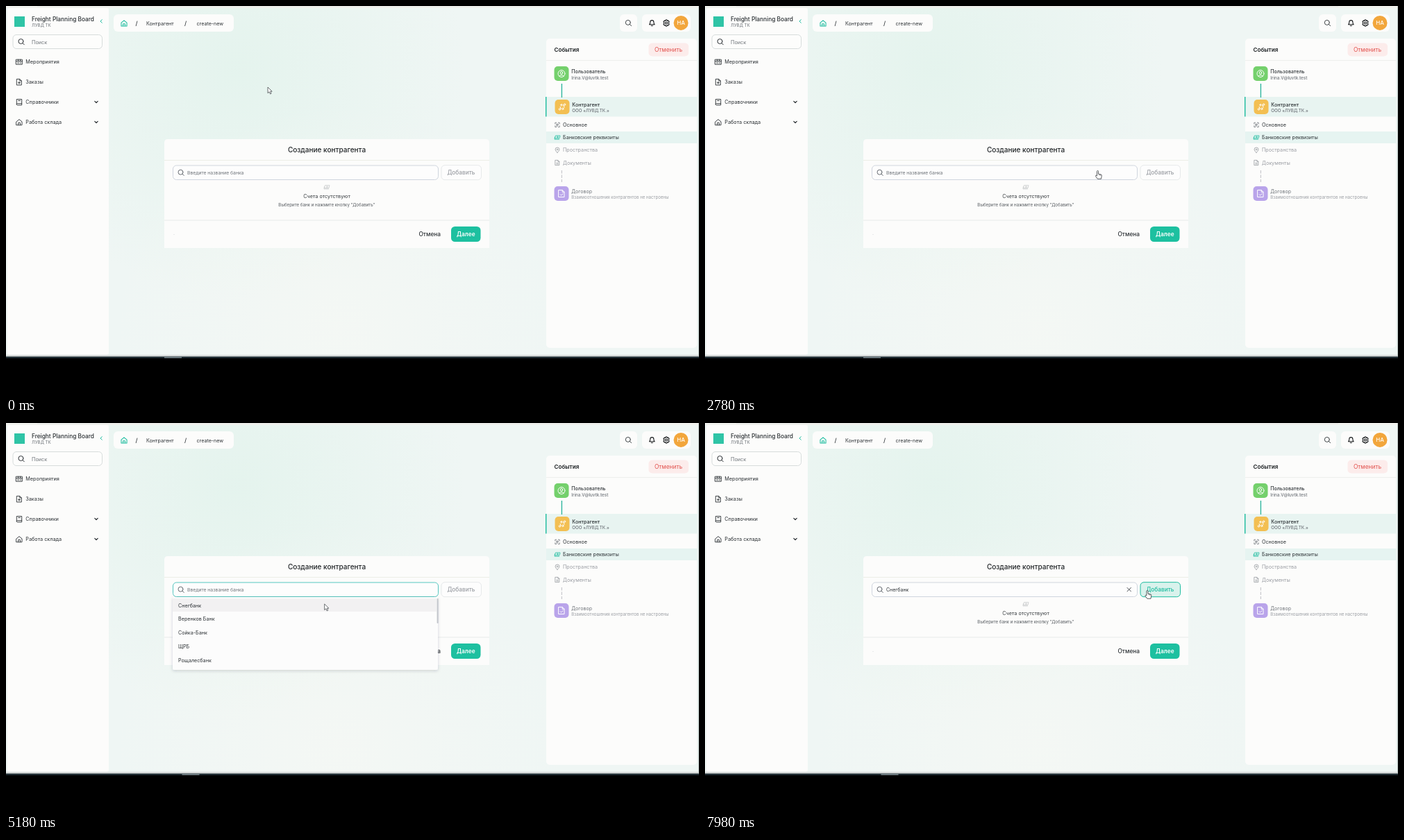
An HTML page that plays this animation: 998 px wide and 561 px high, repeating every 8000 ms.

```html
<!DOCTYPE html>
<html lang="ru">
<head>
<meta charset="utf-8">
<title>Создание контрагента</title>
<style>
  html, body { margin: 0; width: 100%; height: 100%; overflow: hidden; background: #000; }
  svg { display: block; width: 998px; height: 561px; font-family: Inter, "Noto Sans", sans-serif; }
  .icon { fill: none; stroke-linecap: round; stroke-linejoin: round; }
</style>
</head>
<body>
<svg id="stage" viewBox="0 0 998 561" xmlns="http://www.w3.org/2000/svg"></svg>
<script>
const LOOP = 8000;
const INK = '#2b3034', MUTED = '#6f747a', PALE = '#9a9da3', GREEN = '#1cbc9f', PANEL = '#fcfcfb';
const BANKS = ['Снегбанк', 'Веренков Банк', 'Сойка-Банк', 'ЩРБ', 'Рощалесбанк'];

// Text is placed by its vertical middle.
const text = (x, y, size, str, fill = INK, weight = 400, anchor = 'start') =>
  `<text x="${x}" y="${(y + size * .36).toFixed(2)}" font-size="${size}" font-weight="${weight}" fill="${fill}" text-anchor="${anchor}">${str}</text>`;
const box = (x, y, w, h, r, fill, extra = '') =>
  `<rect x="${x}" y="${y}" width="${w}" height="${h}" rx="${r}" fill="${fill}" ${extra}/>`;
const icon = (x, y, d, color = INK, width = .9) =>
  `<path class="icon" transform="translate(${x} ${y})" d="${d}" stroke="${color}" stroke-width="${width}"/>`;
const line = (x1, y1, x2, y2, color, width = 1, extra = '') =>
  `<path d="M${x1} ${y1}L${x2} ${y2}" stroke="${color}" stroke-width="${width}" ${extra}/>`;
const group = (id, body) => `<g id="${id}">${body}</g>`;

// Icon outlines, centred on 0,0.
const SHAPES = {
  search: 'M3 -.5A3.5 3.5 0 1 1 -4 -.5A3.5 3.5 0 1 1 3 -.5M2 2L4.3 4.3',
  home: 'M-4 -.8L0 -4.2L4 -.8V4H-4ZM-1.4 4V.8H1.4V4',
  events: 'M-4.3 -3.5H4.3V3.5H-4.3ZM-4.3 -1H4.3M-1.5 -3.5V-1M1.5 -3.5V-1M-2.5 1.3H-.5M1.2 1.3H2.6',
  order: 'M-3.3 -4.3H.8L3.3 -1.8V4.3H-3.3ZM.8 -4.3V-1.8H3.3M-1.5 1H1.5M0 -.5V2.5',
  book: 'M-3.7 3V-4.2H3.7V4.2H-2.6Q-3.7 4.2 -3.7 3Q-3.7 2 -2.6 2H3.7M-1.3 -2.2H1.5',
  down: 'M-2.2 -1.1L0 1.1L2.2 -1.1',
  bell: 'M-3.8 2.6Q-2.6 1.3 -2.6 -.8A2.6 2.8 0 0 1 2.6 -.8Q2.6 1.3 3.8 2.6ZM-1 4.2Q0 4.9 1 4.2',
  gear: 'M-1 -4.4H1L1.4 -3L2.9 -3.4L4.1 -1.7L3.2 -.6V.6L4.1 1.7L2.9 3.4L1.4 3L1 4.4H-1L-1.4 3L-2.9 3.4L-4.1 1.7L-3.2 .6V-.6L-4.1 -1.7L-2.9 -3.4L-1.4 -3ZM1.5 0A1.5 1.5 0 1 1 -1.5 0A1.5 1.5 0 1 1 1.5 0',
  user: 'M5 0A5 5 0 1 1 -5 0A5 5 0 1 1 5 0M1.8 -1.2A1.8 1.8 0 1 1 -1.8 -1.2A1.8 1.8 0 1 1 1.8 -1.2M-3.2 3.7Q0 .2 3.2 3.7',
  route: 'M-2 -2.8H.3Q2.8 -2.8 2.8 -.3V1M2 2.8H-.3Q-2.8 2.8 -2.8 .3V-.3M-.6 -4.4L-2.2 -2.8L-.6 -1.2M.6 1.2L2.2 2.8L.6 4.4M4.8 -3.4A1.2 1.2 0 1 1 2.4 -3.4A1.2 1.2 0 1 1 4.8 -3.4M-2.4 3.4A1.2 1.2 0 1 1 -4.8 3.4A1.2 1.2 0 1 1 -2.4 3.4',
  contract: 'M-4 -5H1.2L4 -2.2V5H-4ZM1.2 -5V-2.2H4M-1.8 1.3L-.4 2.7L2 .2',
  scan: 'M-3.2 -1.4V-3.2H-1.4M1.4 -3.2H3.2V-1.4M3.2 1.4V3.2H1.4M-1.4 3.2H-3.2V1.4M-1.4 -1.2H1.4M-1.4 .2H1.4M-1.4 1.6H.6',
  cash: 'M-2.2 -2.6H4L3 1.2H-3.2ZM-3.6 -.6L-4 2.6H2.6M1.3 -.7A.9 .9 0 1 1 -.5 -.7A.9 .9 0 1 1 1.3 -.7',
  pin: 'M0 3.7Q-3 .9 -3 -.8A3 3 0 0 1 3 -.8Q3 .9 0 3.7ZM1 -.8A1 1 0 1 1 -1 -.8A1 1 0 1 1 1 -.8',
  file: 'M-2.8 -3.6H.8L2.8 -1.6V3.6H-2.8ZM.8 -3.6V-1.6H2.8M-1.2 .4H1.2M-1.2 2H1.2',
  cross: 'M-2.7 -2.7L2.7 2.7M2.7 -2.7L-2.7 2.7'
};

const page = [
  box(0, 0, 998, 506, 0, '#eff6f4'),
  box(148, 3, 850, 500, 0, 'url(#mint)'),
  box(148, 3, 850, 500, 0, 'url(#cream)'),
  box(0, 0, 998, 3, 0, '#f1f2ee'),
  line(45, .8, 912, .8, '#e2e5e2', .8),
  box(0, 503, 998, 2.5, 0, '#dcdfde'),
  box(0, 505.5, 998, 2.5, 0, '#1d2a30'),
  line(997.5, 0, 997.5, 505, '#aeb8b6', 1)
];

const sidebar = [
  box(2, 3, 146, 500, 3, PANEL),
  box(12, 15, 15, 15, 0, '#2fc4a6'),
  text(37, 18.7, 8.32, 'Freight Planning Board', INK, 500),
  text(37, 27.8, 6.24, 'ЛУВД ТК', MUTED),
  icon(137, 22, 'M1.3 -2.3L-1 0L1.3 2.3', GREEN, 1),
  box(10, 41.5, 128.5, 20, 5, '#fdfdfc', 'stroke="#d3d8d8" stroke-width=".9"'),
  icon(22, 51.5, SHAPES.search, INK, 1),
  text(37, 52, 7.28, 'Поиск', MUTED),
  ...[['events', 'Мероприятия'], ['order', 'Заказы'], ['book', 'Справочники'], ['home', 'Работа склада']]
    .map(([shape, label], i) => {
      const y = 80.7 + i * 29;
      return icon(19, y, SHAPES[shape]) + text(28.3, y, 7.28, label) +
        (i > 1 ? icon(130, y - .3, SHAPES.down, INK, 1.2) : '');
    })
];

const header = [
  box(155, 12, 173, 25, 6, PANEL),
  icon(170, 25, SHAPES.home, GREEN, 1.1),
  text(188, 25, 8.5, '/', INK, 500, 'middle'),
  text(202, 25, 7.15, 'Контрагент'),
  text(258.5, 25, 8.5, '/', INK, 500, 'middle'),
  text(274.5, 25, 7.15, 'create-new'),
  box(884, 12, 25, 25, 6, PANEL),
  icon(896.3, 24.4, SHAPES.search),
  box(916, 12, 70, 25, 6, PANEL),
  icon(930.3, 24.2, SHAPES.bell, '#16191b', 1.1),
  icon(951, 24.5, SHAPES.gear, '#16191b', 1.1),
  '<circle cx="972" cy="24.4" r="10.5" fill="#f2a63c"/>',
  text(972, 24.6, 8, 'HA', '#fff', 500, 'middle')
];

const steps = [
  box(778, 47, 217, 446, 5, PANEL),
  text(789.5, 63, 8.1, 'События', '#1c2023', 600),
  box(925.5, 53.5, 57.5, 19, 5, '#fceceb'),
  text(954, 63.2, 8.32, 'Отменить', '#e2504c', 400, 'middle'),
  line(778, 78.5, 995, 78.5, '#eeefed'),
  box(778, 131, 217, 28.5, 0, '#e8f4f1'),
  box(777, 131, 1.4, 28.5, 0, GREEN),
  box(778, 181, 217, 17, 0, '#e6f4f1'),
  line(800.4, 112, 800.4, 132, '#2fb59f', 1.4),
  line(800.4, 237, 800.4, 254, '#c8c9cd', 1.2, 'stroke-dasharray="4.5 2"'),
  box(789.5, 87, 21, 21, 5, '#74d06c'),
  icon(800, 97.5, SHAPES.user, '#fff', 1),
  text(814.3, 94.2, 7.1, 'Пользователь', INK, 500),
  text(814.3, 103.3, 6.24, 'Irina.V@luvtk.test', MUTED, 500),
  box(790.5, 135, 21, 21, 5, '#f3bf52'),
  icon(801, 145.5, SHAPES.route, '#fff', 1),
  text(815.3, 142, 7.1, 'Контрагент', INK, 500),
  text(815.3, 151, 6.24, 'ООО «ЛУВД.ТК.»', MUTED, 500),
  ...[['scan', 'Основное', MUTED, INK], ['cash', 'Банковские реквизиты', GREEN, INK],
      ['pin', 'Пространства', PALE, PALE], ['file', 'Документы', PALE, PALE]]
    .map(([shape, label, tint, ink], i) => {
      const y = 171.4 + i * 18.2;
      return icon(794, y, SHAPES[shape], tint, .8) + text(802, y, 7.2, label, ink);
    }),
  box(789.5, 260, 21, 21, 5, '#b9a4ea'),
  icon(800, 270.5, SHAPES.contract, '#fff', 1),
  text(814.3, 267, 7.1, 'Договор', MUTED),
  text(814.3, 275.6, 6.1, 'Взаимоотношения контрагентов не настроены', PALE)
];

const dialog = [
  '<path d="M228 349V197Q228 192 233 192H691Q696 192 696 197V349Z" fill="#fcfcfb"/>',
  text(462, 207.5, 10.05, 'Создание контрагента', '#202427', 500, 'middle'),
  line(228, 222.5, 696, 222.5, '#eceee6'),
  line(228, 309, 696, 309, '#e8ebe9'),
  box(240.5, 230, 382, 20.5, 5, '#fdfdfd', 'id="field" stroke="#cfd5de" stroke-width="1"'),
  icon(252, 240.2, SHAPES.search, '#555b61', .9),
  group('hint', text(261, 240.2, 6.8, 'Введите название банка', MUTED)),
  group('chosen', text(261, 240.2, 7, BANKS[0]) + icon(610.7, 240.2, SHAPES.cross, '#4b5055', 1)),
  box(627, 229.7, 57.5, 21, 5, '#fdfdfd', 'id="add" stroke-width="1"'),
  group('addLabel', text(655.5, 240.3, 8.32, 'Добавить', 'inherit', 500, 'middle')),
  icon(462, 261.3, SHAPES.cash, '#c6c8ca', .8),
  text(462, 274.3, 7.25, 'Счета отсутствуют', '#34393d', 400, 'middle'),
  text(462, 286.7, 6.2, 'Выберите банк и нажмите кнопку "Добавить"', '#565b60', 400, 'middle'),
  '<circle cx="242" cy="329.5" r=".6" fill="#d3d5d6"/>',
  text(610.3, 329.2, 8.32, 'Отмена', INK, 500, 'middle'),
  box(641, 318, 42.5, 22, 5.5, '#1dc0a0'),
  text(662.3, 329.2, 8.32, 'Далее', '#fff', 600, 'middle')
];

const list = group('list',
  box(240, 251, 382, 105, 2, '#fcfcfc', 'filter="url(#shadow)"') +
  box(240, 253, 380, 19, 0, '#f2f1f2', 'id="hover"') +
  BANKS.map((name, i) => text(248, 263 + i * 19.75, 7.2, name)).join('') +
  box(620.6, 253, 2, 36, 1, '#c3c6cc'));

const pointers =
  `<g id="pointer"><path id="arrow" d="M0 0V8.6L2 6.8L3.5 9.9L5 9.2L3.6 6.2H6.2Z" fill="#fff" stroke="#45494d" stroke-width=".8" stroke-linejoin="round"/>
  <g id="hand" stroke="#34383b" stroke-width=".8" stroke-linejoin="round">
    <path d="M-1 7.5V1A1 1 0 0 1 1 1V4.8L4.6 5.5Q5.9 5.8 5.8 7L5 11.8H-.2L-3 8Q-3.2 6.5 -1.7 6.9Z" fill="#fff"/>
    <path d="M2.6 5.2V7M4.3 5.5V7.2" fill="none" stroke-width=".6"/>
  </g></g>`;

const blob = (id, cx, cy, r, color, alpha) =>
  `<radialGradient id="${id}" gradientUnits="userSpaceOnUse" cx="${cx}" cy="${cy}" r="${r}">
    <stop stop-color="${color}" stop-opacity="${alpha}"/><stop offset="1" stop-color="${color}" stop-opacity="0"/></radialGradient>`;

const stage = document.getElementById('stage');
stage.innerHTML = `<defs>${blob('mint', 330, 90, 330, '#e2f3ec', .8)}${blob('cream', 480, 470, 330, '#f6f8f4', .7)}
  <filter id="shadow" x="-5%" y="-10%" width="110%" height="125%">
    <feDropShadow dx="0" dy="1.5" stdDeviation="2" flood-color="#20303a" flood-opacity=".18"/></filter></defs>` +
  [...page, box(228, 505.5, 25, 2.5, 0, '#69777c', 'id="task"'), ...sidebar, ...header, ...steps, ...dialog, list,
   `<path id="caret" d="M261.8 236V244" stroke="#25292c" stroke-width=".9"/>`, pointers].join('');

const part = Object.fromEntries([...stage.querySelectorAll('[id]')].map(el => [el.id, el]));
const show = (name, on) => part[name].setAttribute('visibility', on ? 'inherit' : 'hidden');
const set = (name, attrs) => Object.entries(attrs).forEach(([k, v]) => part[name].setAttribute(k, v));

// Pointer tip: time, x, y
const PATH = [
  [0, 377, 117], [120, 378, 117], [820, 552, 150], [1300, 665, 222], [1520, 672, 228], [1800, 672, 228],
  [2400, 588, 236], [2780, 565.5, 237.5], [3300, 516, 241], [4000, 474, 258], [4500, 473, 258],
  [4900, 458.7, 261], [6500, 458.7, 261], [7300, 632, 243], [7700, 637, 241.5], [LOOP, 637, 241.5]
];
const FOCUS = 3210, HOVER = 4660, PICK = 5600, ADD_HOVER = 7260;

function pointerAt(t) {
  const i = PATH.findIndex(p => p[0] > t);
  const [t0, x0, y0] = PATH[i - 1], [t1, x1, y1] = PATH[i];
  const u = (t - t0) / (t1 - t0), k = u * u * (3 - 2 * u);
  return [x0 + (x1 - x0) * k, y0 + (y1 - y0) * k];
}

function render(t) {
  const open = t >= FOCUS && t < PICK, picked = t >= PICK, overAdd = t >= ADD_HOVER;
  const handy = (t >= 2160 && t < HOVER) || overAdd;
  show('list', open);
  show('hover', open && t >= HOVER);
  show('caret', open && (t - FOCUS) % 1000 < 500);
  show('hint', !picked);
  show('chosen', picked);
  show('arrow', !handy);
  show('hand', handy);
  set('field', { stroke: open ? '#55c6c0' : '#cfd5de' });
  set('add', { stroke: picked ? GREEN : '#e6e9ea', fill: overAdd ? '#d9f2ec' : '#fdfdfd' });
  set('addLabel', { fill: picked ? GREEN : PALE });
  set('task', { x: t < FOCUS ? 228 : 253.5 });
  set('pointer', { transform: `translate(${pointerAt(t).map(v => v.toFixed(2)).join(' ')})` });
}

const start = performance.now();
function tick() {
  render((performance.now() - start) % LOOP);
  requestAnimationFrame(tick);
}
tick();
</script>
</body>
</html>
```
